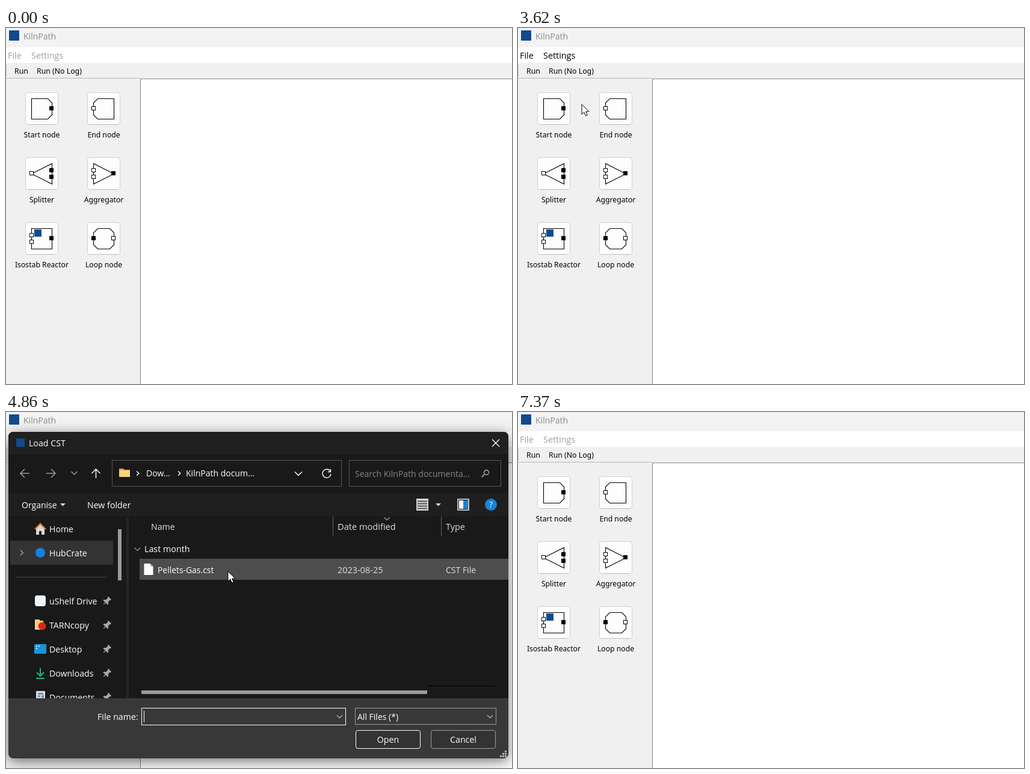
Write an HTML page that moves like this. It is 841 px wide and 592 px high and loops after 7440 ms.

```html
<!DOCTYPE html>
<html lang="en">
<head>
<meta charset="utf-8">
<title>Load a CST file</title>
<style>
html, body { margin: 0; width: 100%; height: 100%; overflow: hidden; background: #fff; }
svg { display: block; font-family: "Open Sans", "Noto Sans", sans-serif; }
text { white-space: pre; }
.node { font-family: "Noto Sans", "Open Sans", sans-serif; }
.dialog { filter: drop-shadow(0 5px 11px rgba(0, 0, 0, .55)); }
</style>
</head>
<body>
<svg id="stage" width="841" height="592" viewBox="0 0 841 592"></svg>
<script>
const LOOP = 7440, STEP = 70;
const APP = 'KilnPath', BLUE = '#124a8c', GREY = '#9b9b9b';

// Markup helpers
const rect = (x, y, w, h, fill, more = '') =>
  `<rect x="${x}" y="${y}" width="${w}" height="${h}" fill="${fill}" ${more}/>`;
const frame = (x, y, w, h, fill, stroke, more = '') =>
  rect(x + .5, y + .5, w - 1, h - 1, fill, `stroke="${stroke}" ${more}`);
const line = (d, stroke, width = 1, more = '') =>
  `<path d="${d}" fill="none" stroke="${stroke}" stroke-width="${width}" ${more}/>`;
const shape = (d, fill, more = '') => `<path d="${d}" fill="${fill}" ${more}/>`;
const text = (x, y, s, size = 14.2, fill = '#fff', more = '') =>
  `<text x="${x}" y="${y}" font-size="${size}" fill="${fill}" ${more}>${s}</text>`;
const group = (id, body, more = '') => `<g id="${id}" ${more}>${body}</g>`;
const down = (x, y, r, color, width = 1.2) =>
  line(`M${x - r} ${y - r / 2}l${r} ${r} ${r} ${-r}`, color, width);
const right = (x, y, color, r = 3.5) =>
  line(`M${x - r / 2} ${y - r}l${r} ${r} ${-r} ${r}`, color, 1.5);

// Main window
const solid = (x, y) => rect(x, y, 7, 7, '#000');
const hollow = (x, y) => frame(x, y, 7, 7, '#fff', '#000');
const outline = d => line(d, '#000', 1.1);

const nodes = [
  ['Start node', outline('M10.5 10.5h27l7 7v20l-7 7h-27z') + solid(40, 23)],
  ['End node', outline('M44.5 10.5h-27l-7 7v20l7 7h27z') + hollow(7, 23)],
  ['Splitter', outline('M10.5 27.5l34-17v34z') + hollow(7, 23) + solid(40, 18) + solid(40, 29)],
  ['Aggregator', outline('M10.5 10.5v34l34-17z') + hollow(7, 18) + hollow(7, 29) + solid(40, 23)],
  ['Isostab Reactor', outline('M10.5 10.5h34v34h-34z') + hollow(7, 18) + hollow(7, 29) +
    solid(40, 23) + rect(15, 12, 12, 12, BLUE)],
  ['Loop node', outline('M17.5 10.5h20l7 7v20l-7 7h-20l-7-7v-20z') + solid(7, 23) + hollow(40, 23)]
];

const nodeButton = ([name, icon], i) => {
  const x = 32 + i % 2 * 103, y = 107 + Math.floor(i / 2) * 108;
  return `<g transform="translate(${x} ${y})">` +
    frame(0, 0, 55, 54, '#fdfdfd', '#d0d0d0', `rx="3.5" id="node${i}"`) +
    line('M4 53.5h47', '#bcbcbc') + icon +
    text(27.5, 75, name, 12.2, '#000', 'class="node" text-anchor="middle"') + '</g>';
};

const appWindow =
  rect(0, 0, 841, 592, '#fff') + rect(0, 0, 841, 32, '#f3f3f3') +
  rect(0, 58, 841, 26, '#f0f0f0') + rect(0, 84, 223, 508, '#f0f0f0') +
  line('M0 83.5h223', '#b8b8b8') + line('M223.5 592V84.5H841', '#828282') +
  line('M.5 62v20', '#a0a0a0', 1, 'stroke-dasharray="2 2"') +
  rect(5, 4, 17, 17, BLUE) + text(29, 19, APP, 14, '#8a8a8a', 'id="appTitle"') +
  text(3, 51, 'File', 14.4, '#a0a0a0', 'id="fileMenu"') +
  text(42, 51, 'Settings', 14.4, '#a0a0a0', 'id="settings"') +
  group('runHover', frame(44, 60, 90, 21, '#e5f3ff', '#cce8ff')) +
  text(14, 76, 'Run', 12.3, '#000', 'class="node"') +
  text(51, 76, 'Run (No Log)', 12.3, '#000', 'class="node"') +
  nodes.map(nodeButton).join('');

const menu = frame(0, 58, 124, 82, '#f9f9f9', '#c8c8c8') +
  group('menuHover', rect(2, 112, 120, 25, '#e5f3ff')) +
  ['New', 'Save CST', 'Load CST'].map((s, i) => text(26, 78 + i * 26, s, 14, '#000')).join('');

// File dialog
const titleBar = group('dialogIcon', rect(17, 44, 14, 14, BLUE)) +
  text(38, 57, 'Load CST', 14.2, '#fff', 'id="dialogTitle"') +
  line('M808 45.5l12 12m0-12l-12 12', '#fff', 1.3);

const addressBar =
  line('M39 102H24m7-7l-7 7 7 7', GREY, 1.5) + line('M67 102h15m-7-7l7 7-7 7', GREY, 1.5) +
  down(113.5, 101.5, 5, GREY, 1.5) + line('M149.500 110V95m-7 7l7-7 7 7', '#fff', 1.5) +
  frame(176, 80, 382, 44, '#191919', '#575757') + frame(570, 80, 253, 44, '#191919', '#575757') +
  shape('M188 94h7l2 2h9v12h-18z', '#dca63e') + rect(188, 97, 18, 11, '#f8d57c', 'rx="1"') +
  right(219, 102, '#fff') + text(233, 107, 'Dow...', 14) + right(288, 102, '#fff') +
  text(299, 107, '', 14, '#fff', 'id="path"') + down(486, 102.5, 6, '#fff', 1.5) +
  line('M539 98.500A7 7 0 1 0 540 103M539.500 95v4.500h-4.500', '#fff', 1.4) +
  text(580, 108, `Search ${APP} documenta...`, 14, '#858585') +
  '<circle cx="798.500" cy="100.500" r="4" fill="none" stroke="#aaa" stroke-width="1.5"/>' +
  line('M795.500 103.500l-5 5', '#aaa', 1.6);

const toolBar =
  rect(751, 145, 18, 18, '#191919', 'stroke="#fff" stroke-width="1.4"') +
  rect(753, 147, 7, 14, '#fff') + rect(760, 147, 8, 14, '#1683d8') +
  '<circle cx="806" cy="154" r="10" fill="#1683d8"/>' +
  text(806, 159, '?', 14, '#fff', 'text-anchor="middle"');

const listHead = text(241, 196, 'Name', 14.2, '#dedede') +
  text(551, 196, 'Date modified', 14.6, '#dedede') + text(731, 196, 'Type', 14.4, '#dedede') +
  line('M543.500 174v32M723.500 174v32', '#636363') + down(633, 177.5, 4.5, '#aaa') +
  rect(225, 463, 475, 6, GREY) + line('M700 455.500h114', '#000');

const pin = y => `<g transform="translate(168 ${y}) rotate(45)">` +
  shape('M-3.500-6.500h7v1.500l-1 1v4l3 2.500v1.500h-11v-1.500l3-2.500v-4l-1-1z', '#a3a9ad') +
  line('M0 3v5', '#a3a9ad', 1.4) + '</g>';

const places = [
  ['Home', 194, shape('M50 194l7-7 7 7v10h-5v-6h-4v6h-5z', '#d8d8d8') +
    line('M48 195l9-9 9 9', '#e07a3c', 2.4)],
  ['HubCrate', 234, '<circle cx="57" cy="234" r="8" fill="#1583dc"/>'],
  ['uShelf Drive', 314, rect(48, 305, 18, 18, '#eef6fd', 'rx="4"')],
  ['TARNcopy', 354, shape('M48 345h7l2 2h5v15h-14z', '#f3cf7a') +
    '<circle cx="60" cy="356" r="6.500" fill="#d9271c"/>'],
  ['Desktop', 394, rect(47, 386, 20, 16, '#1596d8', 'rx="1.500"') +
    line('M50 389.500h2m2 0h2M50 393.500h2', '#d8f1ff', 2)],
  ['Downloads', 434, line('M57 426v13m-6-6l6 6 6-6M50 443h14', '#2bb08f', 2)],
  ['Documents', 474, rect(50, 464, 15, 18, '#d5dde3') +
    line('M53 468.500h9m-9 4h4', '#526a80', 2) + rect(59, 471, 4, 4, '#5e91bd')]
];

const sidebar = rect(7, 214, 171, 40, '#333') + right(26, 234, GREY, 4.5) +
  line('M17 274.500h151', '#444') + rect(186, 195, 6, 85, GREY) +
  places.map(([name, y, icon], i) => icon + text(72, y + 5.5, name, 14.1) + (i > 1 ? pin(y) : '')).join('');

const commands = text(26, 160, 'Organise', 14) + shape('M90 152h9l-4.500 4.500z', '#ddd') +
  text(135, 160, 'New folder', 14.2) + rect(682, 144, 20, 20, '#d0d0d0') +
  line('M684 148.500h16m-16 4h16m-16 4h16m-16 4h16', '#3a3a3a', 1.3) +
  shape('M714 152h9l-4.500 4.500z', '#ddd');

const files = down(218.5, 228, 5, GREY) + text(230, 233, 'Last month', 14.3) +
  rect(222, 244, 613, 35, 'none', 'id="row"') +
  shape('M229.500 252h10l5 5v14h-15z', '#fff') + shape('M239.500 252v5h5z', '#bbb') +
  text(252, 268, 'Pellets-Gas.cst', 13.9) + text(551, 268, '2023-08-25', 14.5, '#dedede') +
  text(731, 268, 'CST File', 14, '#dedede');

const grip = [[0, 0], [0, 4], [0, 8], [-4, 4], [-4, 8], [-8, 8]]
  .map(([x, y]) => rect(829 + x, 563 + y, 3, 3, '#b5b5b5')).join('');

const footer = rect(4, 476, 831, 92, '#383838') +
  text(152, 512, 'File name:', 14.2) + frame(225, 492, 340, 29, '#383838', '#fff', 'id="field"') +
  group('caret', rect(229, 497, 1, 19, '#fff')) + group('marked', rect(228, 497, 95, 19, '#0078d4')) +
  group('fileName', text(229, 512, 'Pellets-Gas.cst', 13.9)) + down(554.5, 506.5, 4.5, '#bbb') +
  frame(580, 492, 235, 28, '#383838', GREY) + text(584, 512, 'All Files (*)', 14) +
  down(804.5, 506.5, 4.5, '#bbb') +
  frame(581, 529, 108, 31, '#333', '#fff', 'rx="3.500" id="open"') +
  text(635, 550, 'Open', 14.2, '#fff', 'text-anchor="middle"') +
  frame(706, 529, 108, 31, '#333', GREY, 'rx="3.500"') +
  text(760, 550, 'Cancel', 14.2, '#fff', 'text-anchor="middle"') + grip;

const dialog =
  rect(4, 33, 831, 543, '#383838', 'rx="8" class="dialog"') +
  shape('M4 70V41a8 8 0 0 1 8-8h815a8 8 0 0 1 8 8v29z', '#202020') +
  rect(4, 70, 831, 406, '#191919') + rect(4, 135, 831, 38, '#1f1f1f') +
  rect(200, 175, 4, 301, '#262626') +
  titleBar + addressBar + toolBar + listHead +
  group('working', text(469, 241, 'Working on it...', 14.25)) +
  group('loaded', commands + sidebar) + group('files', files) + footer;

document.getElementById('stage').innerHTML = appWindow + group('menu', menu) +
  group('dialog', dialog) +
  group('cursor', shape('M0 0V16.500L3.800 12.900 6.500 19 9.200 17.900 6.600 12H11.800Z', '#fff',
    'stroke="#000" stroke-width="1" stroke-linejoin="round"'));

// Pointer moves: start time, end time, from, to
const moves = [
  [460, 1160, 692, 547, 144, 125],
  [1160, 1440, 144, 125, 71, 64],
  [1440, 1720, 71, 64, 16, 46],
  [1870, 1870, 15, 46, 15, 46],
  [2200, 2900, 15, 46, 95, 117],
  [2890, 3030, 95, 117, 106, 127],
  [4030, 4730, 106, 127, 369, 265],
  [5460, 6230, 369, 265, 648, 551],
  [6830, 6970, 648, 551, 704, 588]
];

function pointer(t) {
  const [t0, t1, x0, y0, x1, y1] = moves.findLast(m => t >= m[0]) || moves[0];
  const held = Math.floor((t - t0) / STEP) * STEP;
  const p = t1 > t0 ? Math.min(1, held / (t1 - t0)) : 1;
  const e = t1 - t0 > 600 ? p * p * (3 - 2 * p) : p;
  return [x0 + (x1 - x0) * e, y0 + (y1 - y0) * e];
}

const el = id => document.getElementById(id);
const show = (id, on) => el(id).setAttribute('visibility', on ? 'inherit' : 'hidden');
const set = (id, name, value) => el(id).setAttribute(name, value);

function draw(t) {
  const [x, y] = pointer(t);
  const within = (l, top, w, h) => x >= l && x < l + w && y >= top && y < top + h;
  const from = (a, b = LOOP) => t >= a && t < b;
  const opened = from(3750, 6640), back = from(6640, 7370);
  const present = from(460, 7040);

  set('cursor', 'transform', `translate(${x} ${y})`);
  show('cursor', present);
  set('appTitle', 'fill', from(2200, 3490) || back ? '#000' : '#8a8a8a');
  const active = from(2200, 3750) || back;
  set('settings', 'fill', active ? '#000' : '#a0a0a0');
  set('fileMenu', 'fill', active || from(1720, 2200) ? '#000' : '#a0a0a0');
  show('runHover', present && !opened && t < 2200 && within(44, 60, 90, 21));
  const onEnd = present && t < 2200 && within(135, 107, 55, 54);
  set('node1', 'fill', onEnd ? '#e0eef9' : '#fdfdfd');
  set('node1', 'stroke', onEnd ? '#0078d4' : '#d0d0d0');
  show('menu', from(2200, 3490));
  show('menuHover', from(2200, 3490) && y >= 110);

  show('dialog', opened);
  set('dialog', 'opacity', from(6570, 6640) ? .5 : 1);
  const iconGone = from(6500);
  show('dialogIcon', opened && !iconGone);
  set('dialogTitle', 'x', iconGone ? 13 : 38);
  el('path').textContent = `${APP} ${from(3830) ? 'docum...' : 'docume...'}`;
  show('loaded', opened && from(3830));
  show('working', opened && !from(3900));
  show('files', opened && from(3900));

  const picked = from(4930), pressed = from(6360);
  const rowHover = within(222, 244, 613, 35) ? '#4d4d4d' : 'none';
  set('row', 'fill', pressed ? '#333' : picked ? '#777' : rowHover);
  show('caret', opened && !picked && !from(4310, 4730));
  show('fileName', opened && picked);
  show('marked', opened && pressed);
  set('field', 'stroke', picked ? GREY : '#fff');
  const openHover = within(581, 529, 108, 31);
  set('open', 'fill', pressed ? '#666' : openHover ? '#454545' : '#333');
  set('open', 'stroke', pressed ? GREY : '#fff');
}

function tick() {
  draw(performance.now() % LOOP);
  requestAnimationFrame(tick);
}
tick();
</script>
</body>
</html>
```
